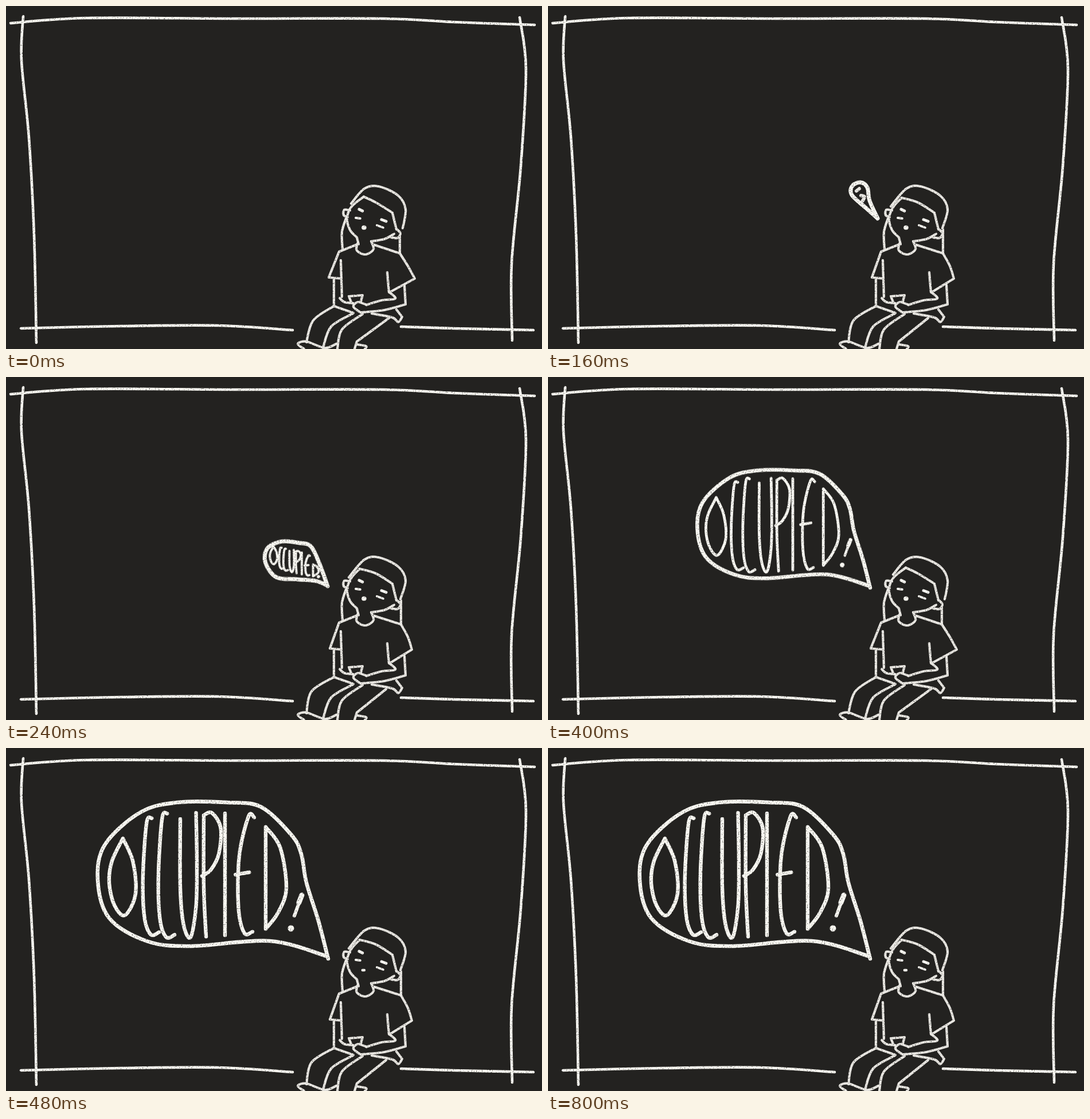
An HTML page for the animation above (960 ms loop, 935 px wide and 599 px high).

```html
<!DOCTYPE html>
<html lang="en">
<head>
<meta charset="utf-8">
<title>Occupied</title>
<style>
  html, body { margin: 0; width: 100%; height: 100%; overflow: hidden; background: #232220; }
  svg { display: block; width: 100%; height: 100%; }
  path { fill: none; stroke-linecap: round; stroke-linejoin: round; }
  .rim { vector-effect: non-scaling-stroke; }
  .timed { opacity: 0; animation: short 960ms step-end infinite; }
  .long { animation-name: long; }
  .half { animation-name: half; }
  .pose { animation: half 320ms step-end infinite; }
  @keyframes short { 0% { opacity: 1 } 8.33333% { opacity: 0 } }
  @keyframes long { 0% { opacity: 1 } 16.66667% { opacity: 0 } }
  @keyframes half { 0% { opacity: 1 } 50% { opacity: 0 } }
</style>
</head>
<body>
<svg viewBox="0 0 935 599" role="img" aria-label="A seated girl says: Occupied!">
  <filter id="chalk" filterUnits="userSpaceOnUse" x="0" y="0" width="935" height="599" color-interpolation-filters="sRGB">
    <feTurbulence type="fractalNoise" baseFrequency=".5" numOctaves="2" seed="4" result="noise"/>
    <feDisplacementMap in="SourceGraphic" in2="noise" scale="1.4" xChannelSelector="R" yChannelSelector="G" result="rough"/>
    <feColorMatrix in="noise" values="0 0 0 0 0  0 0 0 0 0  0 0 0 0 0  0 0 0 3 -.3" result="grain"/>
    <feComposite in="rough" in2="grain" operator="in"/>
  </filter>
  <g id="scene" filter="url(#chalk)"></g>
</svg>
<script>
const WHITE = '#f8f7f1', GREY = '#e9e7e2';
const scene = document.getElementById('scene');

function add(parent, tag, attrs) {
  const node = document.createElementNS('http://www.w3.org/2000/svg', tag);
  for (const name in attrs) node.setAttribute(name, attrs[name]);
  return parent.appendChild(node);
}

// Smooth curve through the points of one run (Catmull-Rom as Béziers).
function curve(points) {
  if (points.length === 1) return 'h0';
  const at = i => points[Math.max(0, Math.min(points.length - 1, i))];
  const handle = (p, a, b) => p.map((v, k) => v + (b[k] - a[k]) / 6);
  return points.slice(1).map((p, i) =>
    `C${handle(at(i), at(i - 1), p)} ${handle(p, at(i + 2), at(i))} ${p}`).join('');
}

// ";" separates strokes, "|" marks a sharp corner.
function outline(text, place) {
  return text.split(';').map(stroke => {
    let last, d = '';
    for (const run of stroke.split('|')) {
      const points = run.trim().split(/\s+/).map(p => place(p.split(',').map(Number)));
      if (last) points.unshift(last);
      else d = 'M' + points[0];
      d += curve(points);
      last = points[points.length - 1];
    }
    return d;
  }).join('');
}

const draw = (parent, width, text, stroke = WHITE, place = p => p) =>
  add(parent, 'path', { d: outline(text, place), 'stroke-width': width, stroke });

const rim = (parent, width, text) => draw(parent, width, text).setAttribute('class', 'rim');

function timed(start, kind = '') {
  const group = add(scene, 'g', { class: 'timed ' + kind });
  group.style.animationDelay = start - 960 + 'ms';
  return group;
}

const scaled = (parent, factor, x, y) =>
  add(parent, 'g', { transform: `translate(${x} ${y}) scale(${factor}) translate(${-x} ${-y})` });

function drawRoom() {
  draw(scene, 4.6, '8,30 140,21 400,22 660,22 780,28 922,33');
  draw(scene, 4.6, '30,18 27,95 40,230 49,400 53,588');
  draw(scene, 4.6, '896,20 907,110 898,280 882,450 883,584');
  draw(scene, 4.6, '26,563 200,559 370,558 500,566; 689,560 780,563 920,566');
}

// lean: 0 or 1, the two alternating drawings
function drawGirl(parent, lean) {
  const ink = text => draw(parent, 4.2, text, GREY);
  const sleeve = 713 - 5 * lean, cuff = 563 + 2 * lean, brow = 624 - 7 * lean;
  const locks = 687 + 2 * lean, nape = 403 - 13 * lean;

  // Head
  ink(`${602 - 4 * lean},${345 + 5 * lean} 625,319 650,315 684,331 697,355 ${692 - 4 * lean},388`);
  ink(`${brow},${333 + 2 * lean} | 603,350 595,370 600,391 612,404 | 615,416`);
  ink(`${brow},${333 + 2 * lean} 645,343 674,361 | 681,390`);
  ink('682,390 688,397 683,405 671,404; 600,357 590,356 589,365 596,369');
  ink(`637,411 660,407 677,398; 593,371 586,395 587,424; ${locks},${nape} ${locks},432`);

  // Shirt
  ink('613,415 612,427 627,434 641,425 637,411');
  ink(`611,417 581,429 | ${cuff},474 | 585,476; 584,444 586,508`);
  ink(`642,417 ${locks},432 | 701,454 ${sleeve},476 | 669,500; 665,465 668,500`);
  ink('638,537 674,544 684,552 691,543 | 681,530');

  // Arms, hands and cup
  ink('695,487 697,521 | 660,531 620,535; 572,477 572,524 | 606,536');
  ink('669,500 | 679,511 655,514 629,522; 582,510 590,517 606,519');
  ink('598,507 622,505 | 619,516; 598,507 603,519');
  ink('629,522 614,517 606,525 618,535');

  // Legs and feet
  ink(`572,524 ${536 - 3 * lean},549 524,587; 605,537 567,560 553,597`);
  ink(`622,538 586,565 578,599; ${668 - 5 * lean},545 612,586 | 608,599`);
  ink('520,599 509,590 524,586 556,597 576,590; 612,591 628,594 626,599');
}

function drawFace() {
  draw(scene, 5, '616,355 622,358; 655,373 663,376');
  draw(scene, 3.8, '610,370 618,371; 647,383 658,387');
  draw(timed(0, 'half'), 7.5, '624,387 625,387');
  draw(timed(480, 'half'), 4.6, '622,388 625,388');
}

// Letter shapes in a unit box
const LETTERS = {
  O: '.52,0 .1,.3 0,.58 .2,.87 .6,1 1,.72 .9,.3 .52,0',
  C: '.56,0 .25,.04 .03,.5 .12,.85 .5,1 1,.98',
  U: '0,.05 0,.6 .2,.9 .62,1 .95,.75 1,.4 .95,0',
  P: '0,.02 0,.6 .13,1; 0,.02 .45,0 .95,.12 .85,.33 .4,.46 -.1,.51',
  I: '0,0 0,1',
  E: '1,.01 .66,0 .1,.34 .05,.78 .4,1 .9,.99; -.13,.5 .7,.48',
  D: '0,0 0,1 | .6,.84 1,.6 .7,.2 0,0'
};
const LEFT = [0, 58, 85, 124, 165, 202, 224, 273];
const WIDTH = { O: 46, P: 31, D: 36 };

// top and bottom give the height of each letter along the word, u from 0 to 1
function drawWord(parent, width, left, scale, top, bottom) {
  [...'OCCUPIED'].forEach((letter, i) => {
    const u = i / 7, y = top(u), height = bottom(u) - y;
    const box = ([px, py]) =>
      [left + (LEFT[i] + px * (WIDTH[letter] || 29)) * scale, y + py * height];
    draw(parent, width, LETTERS[letter], WHITE, box);
  });
}

function seedBubble(parent) {
  rim(parent, 7, '575,371 561,340 557,317 545,308 531,314 530,330 555,353 575,371');
  draw(parent, 6, '538,323 543,319; 546,331 552,333 549,340', GREY);
}

function smallBubble(parent) {
  rim(parent, 7, `559,364 | 535,298 510,248 475,238 425,234 384,254 378,295
    410,338 470,344 525,349 556,361`);
  drawWord(parent, 6.4, 391, .46,
    u => 249 + 22 * u + 30 * u ** 9,
    u => 300 + 35 * Math.sqrt(u));
  draw(parent, 9, '532,337 533,336');
}

// drift: 0 or 1, the two alternating drawings
function largeBubble(parent, drift) {
  rim(parent, 6.6, `${562 + 3 * drift},${368 + 4 * drift} | 545,302 524,235 ${515 + 3 * drift},185 498,152
    ${445 + 10 * drift},103 385,${95 + 4 * drift} 300,95 235,112 173,168 160,230
    ${180 + 4 * drift},297 245,337 320,346 460,337 ${558 + 3 * drift},${363 + 4 * drift}`);
  drawWord(parent, 6.4, 180, 1 - .02 * drift,
    u => 113 + 45 * (1 - u) ** 10 + 25 * u ** 9 - 3 * drift * u,
    u => 331 - 39 * (1 - u) ** 13 - 15 * u ** 4 + 4 * drift);
  draw(parent, 9, `516,${257 - 2 * drift} 511,270`);
  draw(parent, 6, '514,263 503,293');
  draw(parent, 11, `497,${315 + 2 * drift}`);
}

drawRoom();
drawFace();
[0, 1].forEach(lean => {
  const pose = add(scene, 'g', { class: 'timed pose' });
  pose.style.animationDelay = -160 * lean + 'ms';
  drawGirl(pose, lean);
});

seedBubble(scaled(timed(80), .45, 577, 373));
seedBubble(timed(160));
smallBubble(scaled(timed(240), .6, 564, 367));
smallBubble(timed(320));
largeBubble(scaled(timed(400), .75, 562, 368), 0);
[0, 1, 0].forEach((drift, i) => largeBubble(timed(480 + 160 * i, 'long'), drift));
</script>
</body>
</html>
```
